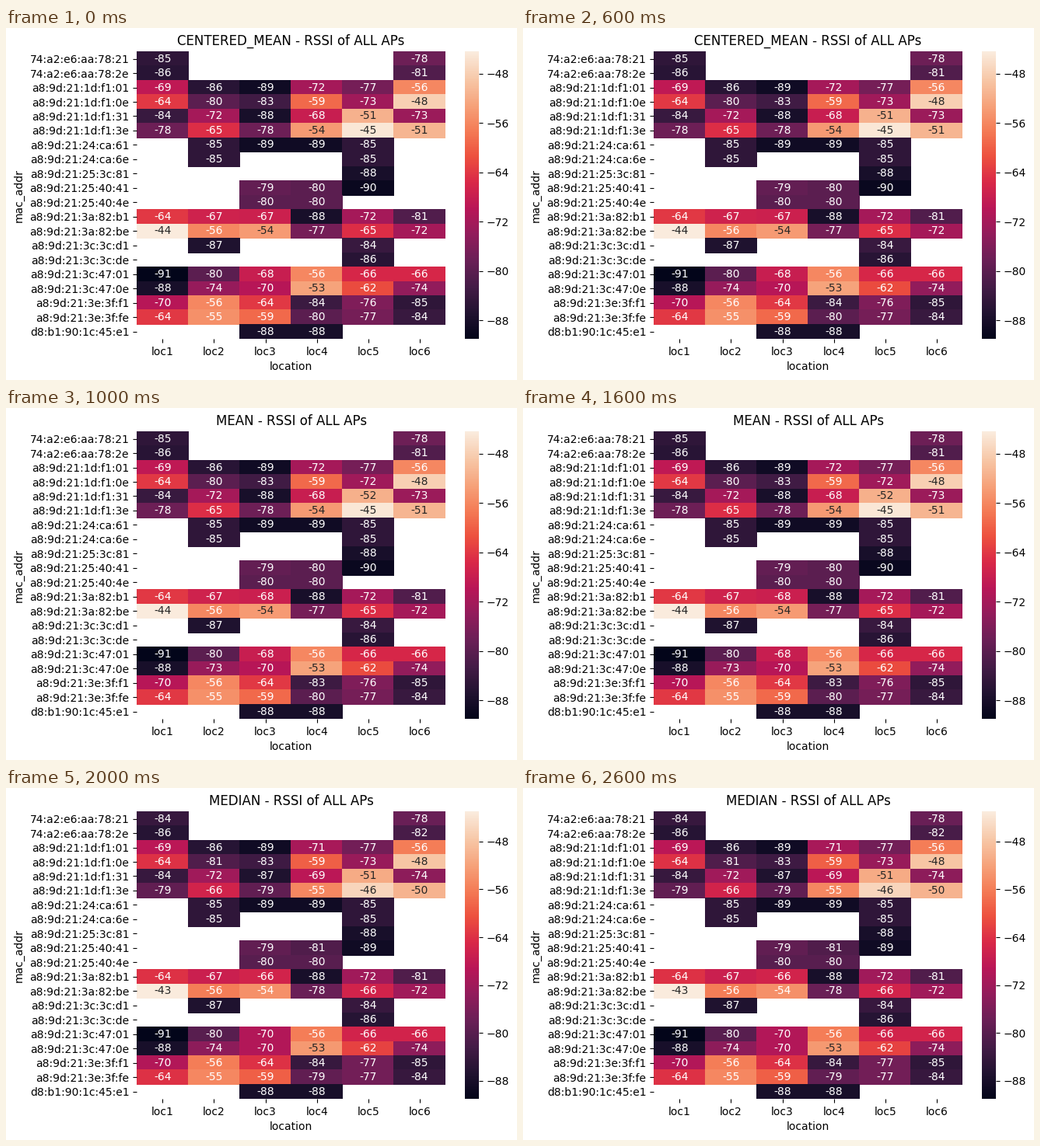
Write a matplotlib script that moves like this. It is 657 px wide and 453 px high and loops after 3 s.

```python
import matplotlib.pyplot as plt
import numpy as np
from matplotlib.animation import FuncAnimation
from matplotlib.colors import LinearSegmentedColormap

W, H, DPI = 657, 453, 100
plt.rcParams["font.family"] = "DejaVu Sans"

ROCKET = LinearSegmentedColormap.from_list("rocket", (
    "#03051a #221331 #451c47 #6a1f56 #921c5b #b91657 "
    "#d92847 #ed513e #f47c56 #f6a47c #f7c9aa #faebdd").split())

# One line per access point: address stem, then dB of loss at each location
# for its bands. Marks: + or - shifts the median by 1 dB, and ^ or v puts
# the mean close to the next half, so that it rounds up or down.
ACCESS_POINTS = """
74:a2:e6:aa:78:2 | 85+ . . . . 78          | 86 . . . . 81-
a8:9d:21:1d:f1:0 | 69 86 89 72+ 77 56      | 64 80- 83 59 73^ 48
a8:9d:21:1d:f1:3 | 84 72 88+ 68- 51v 73-   | 78- 65- 78- 54- 45- 51+
a8:9d:21:24:ca:6 | . 85 89 89 85 .         | . 85 . . 85 .
a8:9d:21:25:3c:8 | . . . . 88 .
a8:9d:21:25:40:4 | . . 79 80- 90+ .        | . . 80 80 . .
a8:9d:21:3a:82:b | 64 67 67v+ 88 72 81     | 44.4+ 56 54 77- 65- 72
a8:9d:21:3c:3c:d | . 87 . . 84 .           | . . . . 86 .
a8:9d:21:3c:47:0 | 91 80 68-- 56 66 66     | 88 74^ 70 53 62 74
a8:9d:21:3e:3f:f | 70 56 64 84^ 76- 85     | 64 55 59 80+ 77 84
d8:b1:90:1c:45:e | . . 88 88 . .
"""
BAND_ENDINGS = "1e"

addrs, rows = [], []
for line in ACCESS_POINTS.strip().splitlines():
    stem, *bands = line.split("|")
    for ending, band in zip(BAND_ENDINGS, bands):
        addrs.append(stem.strip() + ending)
        rows.append(band.split())


def grid_of(rule):
    return np.array([[rule(token) for token in row] for row in rows])


def signed(up, down):
    return grid_of(lambda token: token.count(up) - token.count(down))


level = grid_of(lambda token: np.nan if token == "."
                else -float(token.rstrip("+-^v")))
lean = signed("^", "v")
drift = signed("+", "-")

VIEWS = [("CENTERED_MEAN", level + 0.45 * lean),
         ("MEAN", level + 0.55 * lean),
         ("MEDIAN", np.rint(level) + drift)]


def add_axes(left, width, bottom=53.07, height=369.6):
    return fig.add_axes([left / W, bottom / H, width / W, height / H])


fig = plt.figure(figsize=(W / DPI, H / DPI), dpi=DPI, facecolor="white")
ax = add_axes(168.18, 396.8)
cax = add_axes(589.78, 18.48)

n_rows, n_cols = level.shape
mesh = ax.pcolormesh(np.ma.masked_invalid(level), cmap=ROCKET, snap=False)
ax.set(xlim=(0, n_cols), ylim=(n_rows, 0), xlabel="location",
       ylabel="mac_addr")
ax.set_xticks(np.arange(n_cols) + 0.5,
              [f"loc{i + 1}" for i in range(n_cols)])
ax.set_yticks(np.arange(n_rows) + 0.5, addrs)
ax.spines[:].set_visible(False)
title = ax.set_title("")

bar = fig.colorbar(mesh, cax=cax, ticks=range(-88, -47, 8))
bar.outline.set_linewidth(0)

labels = {(r, c): ax.text(c + 0.5, r + 0.5, "", ha="center", va="center")
          for r, c in np.argwhere(~np.isnan(level))}


def update(i):
    name, values = VIEWS[i]
    low, high = np.nanmin(values), np.nanmax(values)
    title.set_text(f"{name} - RSSI of ALL APs")
    mesh.set_array(np.ma.masked_invalid(values))
    mesh.set_clim(low, high)
    for cell, label in labels.items():
        bright = (values[cell] - low) / (high - low) > 0.775
        label.set_text(f"{values[cell]:.0f}")
        label.set_color("0.15" if bright else "white")
    return [mesh, title, *labels.values()]


anim = FuncAnimation(fig, update, frames=len(VIEWS), interval=1000,
                     repeat=True, repeat_delay=0, blit=False)
plt.show()
```
